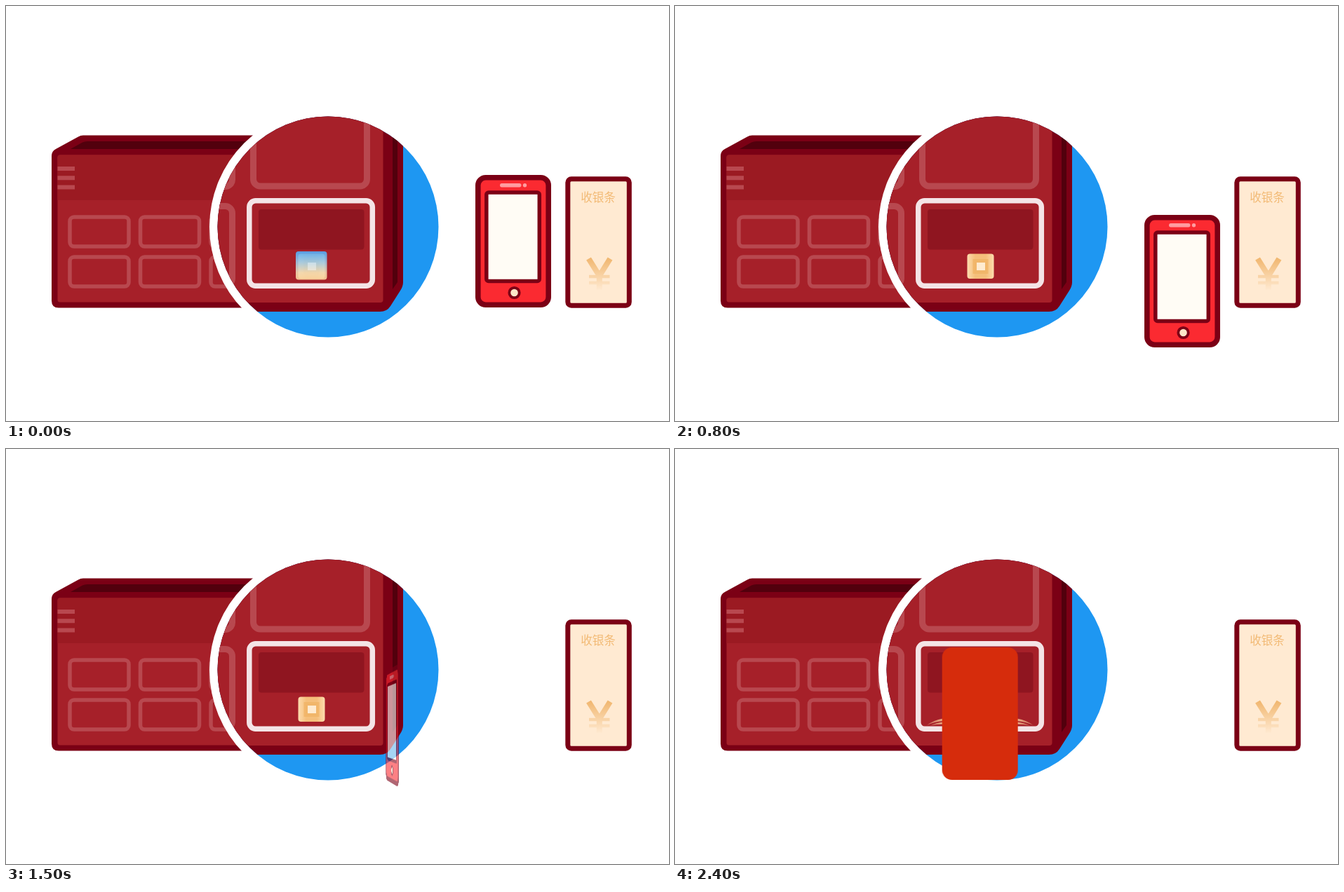
Animation of 945 by 592 pixels, one loop 2700 ms. Source, as an HTML page:

```html
<!DOCTYPE html>
<html lang="zh">
<head>
<meta charset="utf-8">
<title>收银条</title>
<style>
  html, body { margin: 0; width: 100%; height: 100%; overflow: hidden; background: #fff; }
  .stage { position: relative; width: 945px; height: 592px; overflow: hidden; }
  .stage > * { position: absolute; left: 0; top: 0; }
  .phone, .card { width: 108px; height: 189px; }
  .phone { animation: phone 2.7s step-end infinite; }
  .card { border-radius: 14px; background: #d62c0c; animation: card 2.7s step-end infinite; }
  .glow { animation: glow 2.7s steps(6, end) infinite; }
  .rays { animation: rays 2.7s step-end infinite; }

  @keyframes glow {
    0% { opacity: .9; }
    22.22%, 100% { opacity: 0; }
  }
  @keyframes phone {
    0% { transform: translate(669px, 241px); opacity: 1; }
    22.22% { transform: translate(669px, 269.5px); }
    29.62% { transform: translate(669px, 298px); }
    37.03% { transform: translate(621.5px, 298px); }
    44.44% { transform: translate(574px, 298px); opacity: 1; }
    51.85% { transform: translate(535px, 299px) perspective(680px) rotateY(-48deg) scale(.92); opacity: .8; }
    55.55% { transform: translate(496px, 300px) perspective(680px) rotateY(-78.5deg) scale(.87); opacity: .6; }
    59.25%, 100% { transform: translate(496px, 300px); opacity: 0; }
  }
  @keyframes card {
    0% { transform: translate(467px, 299px); opacity: 0; }
    59.25% { transform: translate(467px, 299px) perspective(680px) rotateY(-98deg) scale(.88); opacity: .6; }
    62.96% { transform: translate(437px, 298px) perspective(680px) rotateY(-116deg) scale(.88); opacity: .7; }
    66.66% { transform: translate(408px, 297.5px) perspective(680px) rotateY(-134deg) scale(.884); opacity: .8; }
    70.37% { transform: translate(380.7px, 283px); opacity: .9; }
    74.07%, 100% { transform: translate(380.7px, 283px); opacity: 1; }
  }
  @keyframes rays {
    0% { opacity: 0; }
    74.07% { opacity: 1; }
    85.18% { opacity: .4; }
    88.88%, 100% { opacity: 1; }
  }
</style>
</head>
<body>
<div class="stage">
  <svg width="945" height="592" viewBox="0 0 945 592">
    <defs>
      <clipPath id="lens"><circle cx="459" cy="315" r="157.5"/></clipPath>
      <linearGradient id="blue" x1="0" y1="0" x2="0" y2="1">
        <stop offset="0" stop-color="#4fabf8"/>
        <stop offset=".4" stop-color="#a3cbe4"/>
        <stop offset=".75" stop-color="#f3d9b0"/>
        <stop offset="1" stop-color="#fbd49c"/>
      </linearGradient>
      <linearGradient id="gold">
        <stop offset="0" stop-color="#fddcae"/>
        <stop offset=".3" stop-color="#f5bf7b"/>
        <stop offset=".7" stop-color="#f5bf7b"/>
        <stop offset="1" stop-color="#fddcae"/>
      </linearGradient>
      <linearGradient id="yen" gradientUnits="userSpaceOnUse" x1="0" y1="361" x2="0" y2="406">
        <stop offset="0" stop-color="#f1b872"/>
        <stop offset="1" stop-color="#ffead2"/>
      </linearGradient>
      <linearGradient id="ray" x1="0" x2="1">
        <stop offset="0" stop-color="#ffd9a8" stop-opacity=".35"/>
        <stop offset="1" stop-color="#f6c08c" stop-opacity=".9"/>
      </linearGradient>
      <g id="fan" fill="url(#ray)">
        <path d="M359 394Q368 387 382 384.500V388Q370 389 359 394Z"/>
        <path d="M364 394.500Q372 390.500 382 389.500V392.500Q373 392.500 364 394.500Z"/>
      </g>
      <rect id="cell" width="84" height="42" rx="6"/>
    </defs>

    <!-- machine -->
    <path d="M65 214Q65 207 71 204L103 186.500Q106 184.500 110 184.500H400V430.500H75Q65 430.500 65 420.500Z" fill="#7b0015"/>
    <path d="M92 204L109 194.500Q112 193 116 193H400V204Z" fill="#52000d"/>
    <path d="M77 212.500H400V422.500H77Q73.500 422.500 73.500 419V216Q73.500 212.500 77 212.500Z" fill="#a62029"/>
    <path d="M77 212.500H400V277H73.500V216Q73.500 212.500 77 212.500Z" fill="#9b1a22"/>
    <path d="M73.500 232H98M73.500 245.200H98M73.500 258.400H98" stroke="#b8484f" stroke-width="6"/>
    <g fill="none" stroke="#b8484f" stroke-width="5.500">
      <use href="#cell" x="91" y="301"/>
      <use href="#cell" x="191.500" y="301"/>
      <use href="#cell" x="292" y="301"/>
      <use href="#cell" x="91" y="358"/>
      <use href="#cell" x="191.500" y="358"/>
      <use href="#cell" x="292" y="358"/>
    </g>

    <!-- magnifier -->
    <circle cx="459" cy="315" r="169" fill="#fff"/>
    <g clip-path="url(#lens)">
      <rect x="300" y="156" width="320" height="320" fill="#1e97f2"/>
      <path d="M290 150H566V394Q566 400 562 406L548 428Q543 436 533 436H290Z" fill="#7b0015"/>
      <path d="M551 150H558V394L551 404Z" fill="#52000d"/>
      <path d="M290 150H537.500V419Q537.500 423 533.500 423H290Z" fill="#a62029"/>
      <g fill="none" stroke="#b8484f" stroke-width="9">
        <rect x="200" y="130" width="122.500" height="127.500" rx="10"/>
        <rect x="200" y="285.500" width="122.500" height="113" rx="10"/>
        <rect x="352.500" y="130" width="162" height="127" rx="10"/>
      </g>
      <rect x="360" y="290" width="150.500" height="57.500" rx="4" fill="#8f1520"/>
      <rect x="346.800" y="277.800" width="175.500" height="121.500" rx="9" fill="none" stroke="#f4e4e6" stroke-width="7.500"/>
    </g>

    <!-- chip -->
    <rect x="416.500" y="353.500" width="38" height="35.500" rx="4" fill="url(#gold)"/>
    <rect x="424.500" y="361" width="22" height="21" fill="#f1b364" opacity=".75"/>
    <rect x="430" y="366" width="12" height="11" fill="#ffebd0"/>
    <g class="glow">
      <rect x="413" y="350" width="44.500" height="40.500" rx="4" fill="url(#blue)"/>
      <rect x="430" y="366" width="12" height="11" fill="#fff" opacity=".35"/>
    </g>
    <g class="rays">
      <use href="#fan"/>
      <use href="#fan" transform="matrix(-1 0 0 1 869.500 0)"/>
    </g>

    <!-- cash slip -->
    <rect x="800.800" y="246.800" width="87.500" height="180.500" rx="5" fill="#ffead2" stroke="#7b0015" stroke-width="7"/>
    <text x="844" y="279" text-anchor="middle" font-size="16.5" fill="#f2ba75" font-family="'Noto Sans CJK SC', 'Noto Sans CJK', sans-serif">收银条</text>
    <g fill="none" stroke="url(#yen)">
      <path d="M830.500 360.500L845.800 385L861 360.500M845.800 383V405" stroke-width="8"/>
      <path d="M831 386H860.500M831 395H860.500" stroke-width="4.500"/>
    </g>
  </svg>

  <svg class="phone" viewBox="0 0 108 189">
    <rect x="3.800" y="3.800" width="100.400" height="181.400" rx="11" fill="#fb2a31" stroke="#7b0015" stroke-width="7.600"/>
    <rect x="35" y="12" width="30.500" height="5.500" rx="2.700" fill="#ff9ca0"/>
    <circle cx="70.500" cy="14.800" r="2.700" fill="#ff9ca0"/>
    <rect x="15.800" y="25" width="75.500" height="126.500" rx="3" fill="#fffcf5" stroke="#7b0015" stroke-width="5.500"/>
    <circle cx="55.500" cy="168" r="7.200" fill="#ffe6c8" stroke="#7b0015" stroke-width="3.800"/>
  </svg>
  <div class="card"></div>
</div>
</body>
</html>
```
